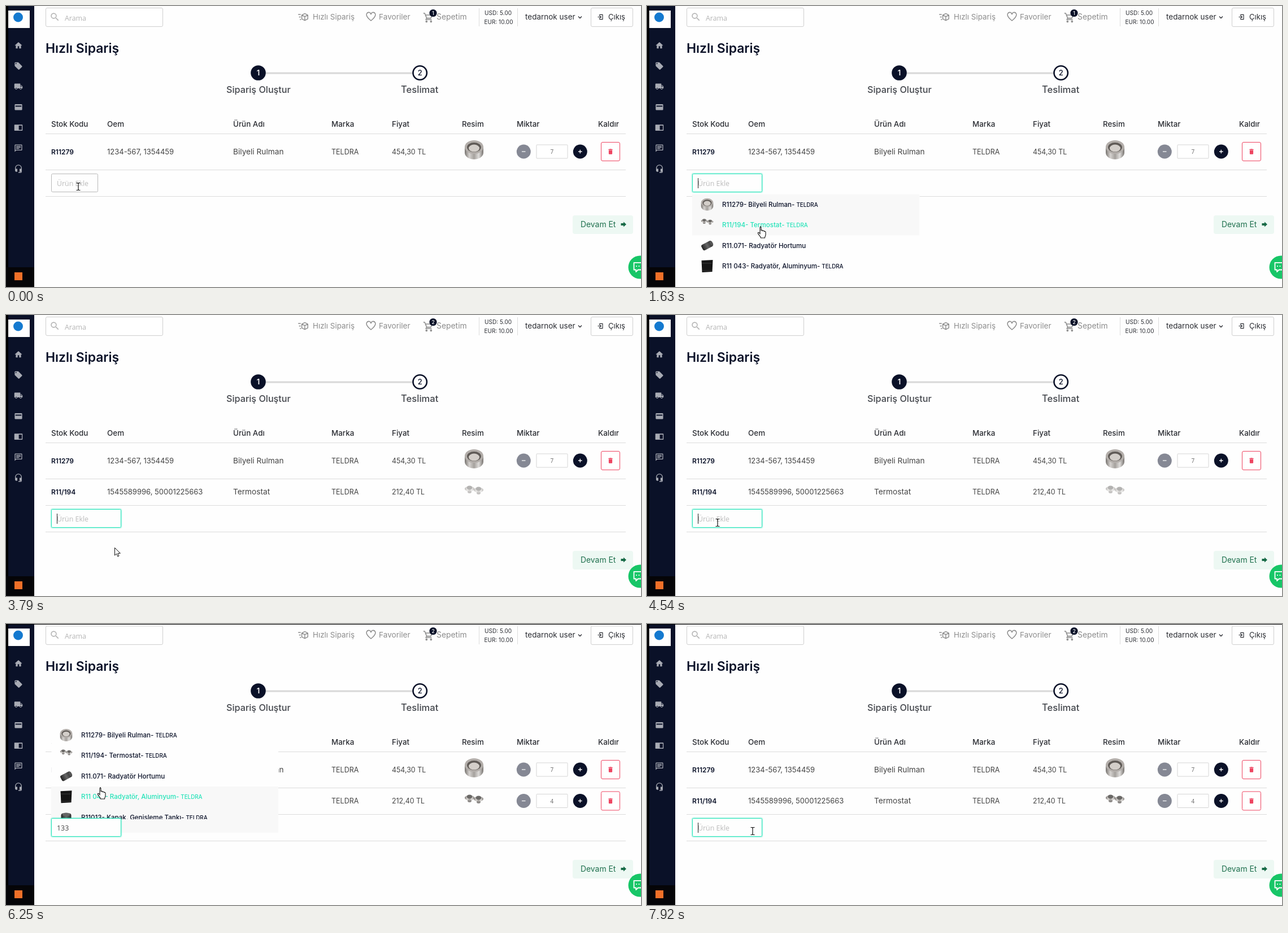
Write an HTML page that moves like this. It is 1124x498 px and loops after 8000 ms.

```html
<!DOCTYPE html>
<html lang="tr">
<head>
<meta charset="utf-8">
<title>Hızlı Sipariş</title>
<style>
html, body { margin: 0; width: 100%; height: 100%; overflow: hidden; background: #fefefe; }
svg { display: block; width: 100%; height: 100%; font-family: Inter, "Open Sans", sans-serif; }
.plain { font-family: "Open Sans", "Noto Sans", sans-serif; }
</style>
</head>
<body>
<svg id="stage" viewBox="0 0 1124 498" xmlns="http://www.w3.org/2000/svg"></svg>
<script>
const LOOP = 8000, STEP = 120, ROW = 36.4, SHIFT = 47;
const NAVY = '#0a1128', INK = '#2b2d33', GREY = '#8d8d8d', LINE = '#dcdcdc', TEAL = '#22e3b8', RED = '#ee4460';
const BRAND = 'TELDRA';

// Markup helpers
const text = (x, y, s, size, color = INK, weight = 400, extra = '') =>
  `<text x="${x}" y="${y}" font-size="${size}" fill="${color}" font-weight="${weight}" ${extra}>${s}</text>`;
const mid = 'text-anchor="middle"';
const rect = (x, y, w, h, fill, extra = '') =>
  `<rect x="${x}" y="${y}" width="${w}" height="${h}" fill="${fill}" ${extra}/>`;
const frame = (x, y, w, h, color, r = 2.5) =>
  rect(x, y, w, h, '#fff', `rx="${r}" stroke="${color}"`);
const circle = (x, y, r, fill, extra = '') => `<circle cx="${x}" cy="${y}" r="${r}" fill="${fill}" ${extra}/>`;
const oval = (x, y, rx, ry, fill) => `<ellipse cx="${x}" cy="${y}" rx="${rx}" ry="${ry}" fill="${fill}"/>`;
const path = (d, extra) => `<path d="${d}" ${extra}/>`;
const group = (id, body, extra = '') => `<g id="${id}" ${extra}>${body}</g>`;
const rule = y => rect(70, y, 1027, 1, LINE);
// 24-unit icon centred on a point
const place = (x, y, k) => `transform="translate(${x} ${y}) scale(${k}) translate(-12 -12)"`;
const icon = (d, x, y, k, color) => path(d, `fill="${color}" fill-rule="evenodd" ${place(x, y, k)}`);
const outline = (d, x, y, k, color, w = 2) =>
  path(d, `fill="none" stroke="${color}" stroke-width="${w}" stroke-linejoin="round" ${place(x, y, k)}`);
const use = (id, x, y, k = 1) => `<use href="#${id}" transform="translate(${x} ${y}) scale(${k})"/>`;

const CHAT = 'M20 2H4a2 2 0 0 0-2 2v18l4-4h14a2 2 0 0 0 2-2V4a2 2 0 0 0-2-2zm0 14H5.2L4 17.2V4h16zM6 12h8v2H6zM6 9h12v2H6zM6 6h12v2H6z';
const BUBBLE = 'M2 3H22V17H10L6 21V17H2zM6 10h2M11 10h2M16 10h2';
const TRASH = 'M6 19a2 2 0 0 0 2 2h8a2 2 0 0 0 2-2V7H6zM19 4h-3.5l-1-1h-5l-1 1H5v2h14z';
const MENU = [
  'M10 20v-6h4v6h5v-8h3L12 3 2 12h3v8z',
  'M21.4 11.6l-9-9A2 2 0 0 0 11 2H4a2 2 0 0 0-2 2v7a2 2 0 0 0 .6 1.4l9 9a2 2 0 0 0 2.8 0l7-7a2 2 0 0 0 0-2.8zM5.5 7a1.5 1.5 0 1 1 0-3 1.5 1.5 0 0 1 0 3z',
  'M20 8h-3V4H3a2 2 0 0 0-2 2v11h2a3 3 0 0 0 6 0h6a3 3 0 0 0 6 0h2v-5zM6 18.5a1.5 1.5 0 1 1 0-3 1.5 1.5 0 0 1 0 3zm13.5-9l2 2.5H17V9.5zm-1.5 9a1.5 1.5 0 1 1 0-3 1.5 1.5 0 0 1 0 3z',
  'M4 4h16a2 2 0 0 1 2 2v12a2 2 0 0 1-2 2H4a2 2 0 0 1-2-2V6a2 2 0 0 1 2-2zM4 8v3h16V8z',
  'M2 4h20a1 1 0 0 1 1 1v14a1 1 0 0 1-1 1H2a1 1 0 0 1-1-1V5a1 1 0 0 1 1-1zM13 6.5v11.5h8V6.5z',
  CHAT,
  'M12 1a9 9 0 0 0-9 9v7a3 3 0 0 0 3 3h3v-8H5v-2a7 7 0 0 1 14 0v2h-4v8h4v1h-7v2h6a3 3 0 0 0 3-3V10a9 9 0 0 0-9-9z'
];
const SEARCH = 'M15.5 14h-.8l-.3-.3a6.5 6.5 0 1 0-.7.7l.3.3v.8l5 5 1.5-1.5zm-6 0a4.5 4.5 0 1 1 0-9 4.5 4.5 0 0 1 0 9z';
const HEART = 'M12 21C5 15 2 12 2 8a5 5 0 0 1 10-1.5A5 5 0 0 1 22 8c0 4-3 7-10 13z';
const CART = 'M1 3h3l4.5 11h9l3.5-7H6M8.5 14l-2 3h13M8 20a1.3 1.3 0 1 0 .1 0M18 20a1.3 1.3 0 1 0 .1 0';
const BOX = 'M14.5 4l7 3.5v9l-7 3.5-7-3.5v-9zM7.5 7.5l7 3.5 7-3.5M14.5 11v9M-1 6h6M1 12h4M3 18h3';
const EXIT = 'M9 3H21V21H9M9 3V8M9 21V16M2 12H15M11 8l4 4-4 4';

function defs() {
  const shade = (id, stops) => `<linearGradient id="${id}">${stops.map((c, i) =>
    `<stop offset="${i / (stops.length - 1)}" stop-color="${c}"/>`).join('')}</linearGradient>`;
  const valve = (x, y) => rect(x - 3.5, y, 7, 8, '#8d8a88', 'rx="3"') + oval(x, y, 8.5, 4.5, 'url(#steel)') +
    oval(x, y - 2, 5, 3.5, '#6a6866');
  return `<defs>${shade('steel', ['#77736f', '#d5d2cf', '#a5a19d', '#dedcda', '#77736f'])}
  ${shade('rubber', ['#222', '#666', '#292929'])}
  ${group('bearing', path('M-16.5-5V5C-16 20.500 16 20.500 16.500 5V-5z', 'fill="url(#steel)"') +
    oval(0, -5, 16.5, 12, '#b3aeaa') + oval(0, -4.5, 12.5, 8.5, '#5f5a56') + oval(0, -3, 9.5, 6.5, '#d3cec9'))}
  ${group('valves', valve(-8, -2) + valve(8, 0))}
  ${group('hose', `<g transform="rotate(-28)">${rect(-10, -5.5, 20, 11, 'url(#rubber)', 'rx="3"')}${oval(8.5, 0, 2.5, 4.5, '#555')}</g>`)}
  ${group('radiator', path('M-10-10L10-11 9 10-9 11z', 'fill="#141414"') + path('M-9-5H8M-8 8H8', 'stroke="#3a3a3a"'))}
  ${group('cap', rect(-9, -7, 18, 14, 'url(#rubber)', 'rx="4"') + oval(0, -5, 7, 3, '#666'))}
  <clipPath id="below">${rect(80, 331, 403, 152, '#000')}</clipPath>
  <clipPath id="above">${rect(80, 186, 403, 160, '#000')}</clipPath>
  <clipPath id="aboveWide">${rect(80, 186, 403, 184, '#000')}</clipPath></defs>`;
}

function sidebar() {
  return rect(0, 0, 50, 498, NAVY) + rect(0, 0, 4, 498, '#000') + rect(0, 463, 50, 35, '#050508') +
    rect(4, 8, 38, 31, '#fff') + circle(21.5, 20, 8.5, '#1479cf') + rect(15, 472, 14, 14, '#f07028') +
    MENU.map((d, i) => icon(d, 22, 70 + i * ROW, .66, '#a8abb4')).join('');
}

function header() {
  return frame(70.5, 3.5, 207, 33, '#cfcfcf') + icon(SEARCH, 86.5, 19.5, .8, '#b5b5b5') +
    text(104, 25.5, 'Arama', 12.4, '#b4b4b4', 400, 'class="plain"') +
    outline(BOX, 527, 19.5, .76, GREY, 1.9) + text(543, 24, 'Hızlı Sipariş', 13.4, GREY) +
    outline(HEART, 646, 19, .78, GREY) + text(660, 24, 'Favoriler', 13.6, GREY) +
    outline(CART, 747.5, 20, .8, GREY) + text(762, 24, 'Sepetim', 13.9, GREY) +
    circle(756, 12.5, 6.6, NAVY) + text(756, 15.6, '1', 8.5, '#fff', 500, mid + ' id="badge"') +
    rect(837, 4, 1, 32, LINE) + rect(905, 4, 1, 32, LINE) +
    text(847, 16, 'USD: 5.00', 10.1) + text(846.5, 31.5, 'EUR: 10.00', 10) +
    text(919, 24, 'tedarnok user', 13.5) + path('M1013 18.5l3 3 3-3', `fill="none" stroke="${INK}" stroke-width="1.3"`) +
    frame(1035.5, 3.5, 74, 33, '#cfcfcf') + outline(EXIT, 1052, 19.5, .45, INK, 2.6) + text(1066, 24, 'Çıkış', 13.1);
}

function stepper() {
  return text(70, 83, 'Hızlı Sipariş', 22.9, NAVY, 600) + rect(459, 117.5, 262, 3, '#d8d8d8') +
    circle(446.5, 118.5, 13.3, NAVY) + text(446.5, 123, '1', 13, '#fff', 600, mid) +
    circle(732.7, 118.5, 12.2, '#fff', `stroke="${NAVY}" stroke-width="2.6"`) + text(732.7, 123, '2', 13, NAVY, 500, mid) +
    text(390, 154, 'Sipariş Oluştur', 16.2, '#44474d', 500) + text(699, 154, 'Teslimat', 16.6, '#44474d', 500);
}

function product(y, code, oem, name, price) {
  return text(80, y + 4.5, code, 12, NAVY, 600) + text(179, y + 4.5, oem, 13, '#444') +
    text(402, y + 4.5, name, 13.7, '#444') + text(576, y + 4.5, BRAND, 12.5, '#444') +
    text(683, y + 4.5, price, 12.4, '#444');
}

function controls(y, count) {
  return circle(916.3, y, 12.5, '#858894') + rect(913, y - .6, 6.5, 1.2, '#fff') +
    frame(939, y - 12, 55, 24, '#d5d5d5', 1) + text(966.3, y + 4, count, 10, '#666', 400, mid + ' class="plain"') +
    circle(1016.3, y, 12.5, NAVY) + path(`M1013 ${y}h6.6M1016.3 ${y - 3.3}v6.6`, 'stroke="#fff" stroke-width="1.3"') +
    frame(1053.5, y - 16.5, 33, 33, RED) + icon(TRASH, 1070, y, .52, RED);
}

function table() {
  const heads = [[80, 'Stok Kodu'], [179, 'Oem'], [402, 'Ürün Adı'], [576, 'Marka'], [683, 'Fiyat'], [807, 'Resim'], [904, 'Miktar'], [1048, 'Kaldır']];
  return heads.map(([x, s]) => text(x, 213.5, s, 13.4, INK, 500)).join('') +
    rule(226) + rule(290) + rule(337) +
    product(258, 'R11279', '1234-567, 1354459', 'Bilyeli Rulman', '454,30 TL') + use('bearing', 828.5, 255) + controls(258, 7) +
    group('added', rule(384) + product(313, 'R11/194', '1545589996, 50001225663', 'Termostat', '212,40 TL') +
      group('addedPic', use('valves', 828.5, 310)) + group('addedCtl', controls(313.5, 4)));
}

const ITEMS = [['bearing', 'R11279- Bilyeli Rulman-', .65], ['valves', 'R11/194- Termostat-', .65, 6],
  ['hose', 'R11.071- Radyatör Hortumu'], ['radiator', 'R11 043- Radyatör, Aluminyum-'], ['cap', 'R11013- Kapak, Genişleme Tankı-']];

function list(id, top, clip, wide, back) {
  const rows = ITEMS.map(([pic, label, k = 1, lift = 0], i) => {
    const y = top + (i + .5) * ROW;
    const brand = label.endsWith('-') ? `<tspan dx="3" font-size="9.8">${BRAND}</tspan>` : '';
    return use(pic, 106.5, y - lift, k) + text(133, y + 4, label + brand, 11.55, NAVY, 500, 'class="item"');
  }).join('');
  return group(id, back + `<g clip-path="url(#${wide})">${rect(80, top, 402, ROW, '#f8f8f8', 'class="hover"')}</g>` +
    `<g clip-path="url(#${clip})">${rows}</g>`);
}

const HAND = 'M-3-9c1.5 0 2 1 2 2v5c.5-1 3-.8 3 .6 .8-.7 2.6-.4 2.6 1 1-.5 2.4 0 2.4 1.4v4c0 3-1.5 3.5-1.5 6h-7c0-2.5-4-5-5-8-.5-1.8 1-2.3 2-1l1.5 1.6V-7c0-1 .5-2 2-2z';
const ARROW = 'M-4.5-7.5V6l3.2-3 2.1 5 2.2-1-2.1-4.7h4.4z';
const BEAM = 'M-3.5-6.5h2.5l1 1 1-1h2.5M0-5.5V5.5M-3.5 6.5h2.5l1-1 1 1h2.5';

const stage = document.getElementById('stage');
stage.innerHTML = defs() + rect(0, 0, 1124, 498, '#fefefe') + sidebar() + header() + stepper() + table() +
  group('next', rect(1003, 371, 107, 33, '#edf8f3', 'rx="4"') + text(1017, 391.5, 'Devam Et', 13.9, '#20714f') +
    path('M1088.5 385h4.5v-2.5l5 4.5-5 4.5v-2.5h-4.5z', 'fill="#176b47"')) +
  list('listLow', 333.6, 'below', 'below', rect(80.5, 331, 402, 152, '#fefefe')) +
  list('listHigh', 178.8, 'above', 'aboveWide', rect(80.5, 186, 401.5, 160, '#fefefe') + rect(205, 345, 268, 1.5, '#e2e2e2')) +
  group('field', rect(79.5, 296.5, 125, 34, 'none', `rx="3" stroke="${TEAL}" stroke-opacity=".25" stroke-width="2" id="glow"`) +
    rect(80.5, 297.5, 82, 32, '#fefefe', 'rx="2" id="box"') + text(90, 319, '', 12.4, '#444', 400, 'class="plain" id="entry"') +
    rect(90, 305, 1, 18, '#222', 'id="caret"')) +
  circle(1122, 463, 20.5, '#17c667') + outline(BUBBLE, 1120.5, 463, .9, '#fff') +
  rect(4, 0, 1120, 1, '#000', 'id="topLine"') +
  group('cursor', path(HAND, 'id="hand" fill="#fff" stroke="#111" stroke-width="1.1"') +
    path(ARROW, 'id="arrow" fill="#fff" stroke="#111"') + path(BEAM, 'id="beam" fill="none" stroke="#111" stroke-width="1.2"'));

const el = {};
stage.querySelectorAll('[id]').forEach(n => el[n.id] = n);
const show = (n, on) => n.setAttribute('opacity', +on);
const set = (n, attrs) => Object.entries(attrs).forEach(([k, v]) => n.setAttribute(k, v));
const between = (t, a, b) => t >= a && t < b;
const ramp = (t, a, b) => Math.max(0, Math.min(1, Math.floor((t - a) / STEP) * STEP / (b - a)));

// Pointer path: time, x, y
const MOVES = [[0, 128, 320], [130, 128, 320], [370, 130, 317], [650, 130, 317], [1130, 152, 338], [1150, 152, 338],
  [1630, 203, 400], [3550, 205, 399], [3790, 197, 420], [4030, 172, 416], [4060, 172, 416], [4540, 125, 368],
  [5280, 125, 368], [5400, 128, 368], [5650, 128, 368], [6250, 169, 299], [6490, 185, 284], [7060, 185, 284],
  [7540, 186, 340], [7560, 186, 340], [7920, 187, 367], [LOOP, 187, 367]];

function pointer(t) {
  const i = MOVES.findIndex((m, n) => n && t < m[0]);
  const [t0, x0, y0] = MOVES[i - 1], [t1, x1, y1] = MOVES[i];
  const k = Math.floor((t - t0) / STEP) * STEP / (t1 - t0);
  return [Math.round(x0 + (x1 - x0) * k), Math.round(y0 + (y1 - y0) * k)];
}

// Rows already crossed keep their pale bar
function paintList(node, top, alpha, row, first) {
  show(node, alpha);
  node.querySelectorAll('.item').forEach((n, i) => n.setAttribute('fill', i === row ? TEAL : NAVY));
  const a = Math.min(row, first), b = Math.max(row, first);
  const bar = node.querySelector('.hover');
  show(bar, row >= 0);
  if (row >= 0) set(bar, { y: top + a * ROW, height: (b - a + 1) * ROW + (first ? 9 : 0) });
}

function draw(t) {
  const [x, y] = pointer(t);
  const focused = t >= 620, added = t >= 3270, shift = added ? SHIFT : 0;
  const low = ramp(t, 500, 740) * (1 - ramp(t, 2010, 2370));
  const high = ramp(t, 4780, 5140) * (1 - ramp(t, 6800, 7160));

  const overField = between(y, 297 + shift, 331 + shift) && x < 205;
  const overList = low > 0 ? y >= 331 : high > 0 && y < 344;
  const kind = overField ? 'beam' : overList ? 'hand' : 'arrow';
  ['hand', 'arrow', 'beam'].forEach(k => show(el[k], k === kind));
  el.cursor.setAttribute('transform', `translate(${x} ${y})`);

  const rowAt = top => kind === 'hand' ? Math.max(0, Math.min(4, Math.floor((y - 9 - top) / ROW))) : -1;
  paintList(el.listLow, 333.6, low, low ? rowAt(333.6) : -1, 0);
  paintList(el.listHigh, 178.8, high, high ? rowAt(178.8) : -1, 4);

  show(el.added, added);
  show(el.addedPic, .5 + .5 * ramp(t, 4540, 4780));
  show(el.addedCtl, ramp(t, 4540, 4780));
  el.badge.textContent = added ? 2 : 1;
  el.next.setAttribute('transform', `translate(0 ${shift})`);

  const typed = between(t, 4900, 6920) ? '133'.slice(0, t < 5140 ? 1 : t < 5400 ? 2 : 3) : '';
  el.field.setAttribute('transform', `translate(0 ${shift})`);
  set(el.box, { width: focused ? 123 : 82, stroke: focused ? TEAL : '#b9b9b9' });
  show(el.glow, focused);
  el.entry.textContent = typed || 'Ürün Ekle';
  el.entry.setAttribute('fill', typed ? '#444' : '#bcbcbc');
  const blink = t < 5400 ? (t + 1870) % 1060 : (t - 5400) % 1060;
  show(el.caret, focused && (between(t, 4900, 5400) || blink < 530));
  el.caret.setAttribute('x', 90 + typed.length * 7);

  show(el.topLine, between(t, 2530, 3390) || between(t, 6130, 6920) || t >= 7800);
}

const start = performance.now();
function tick() {
  draw((performance.now() - start) % LOOP);
  requestAnimationFrame(tick);
}
tick();
</script>
</body>
</html>
```
